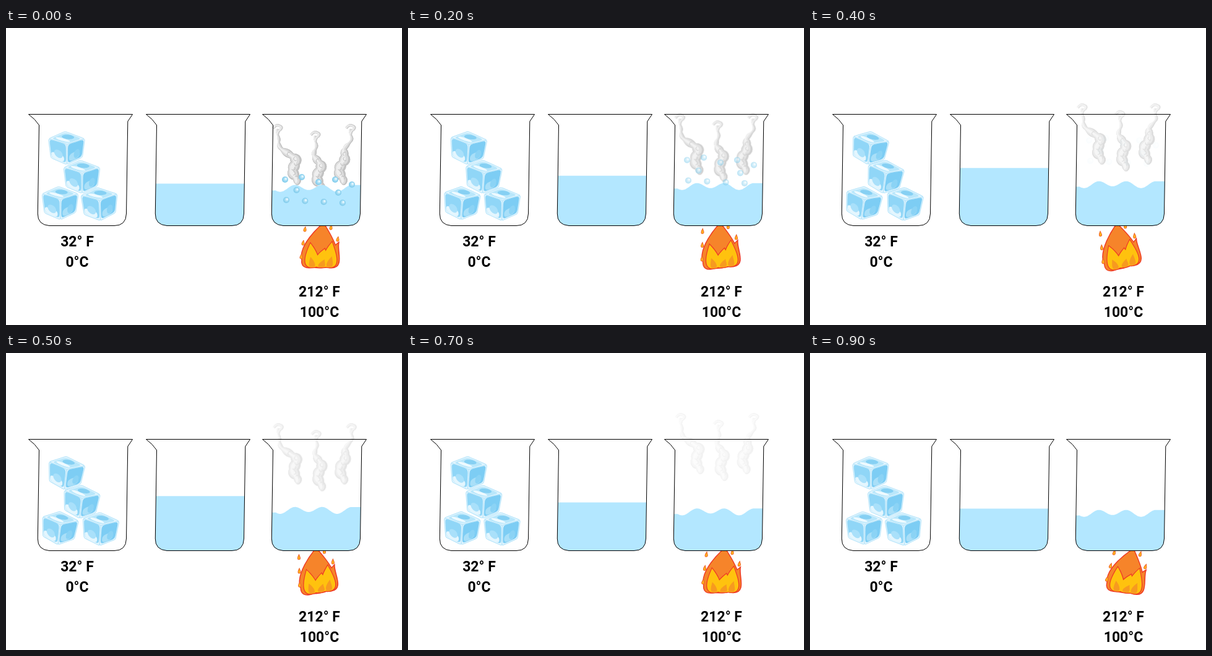
An HTML page with a canvas for the animation above (1000 ms loop, 640 by 480 pixels).

```html
<!DOCTYPE html>
<html lang="en">
<head>
<meta charset="utf-8">
<title>States of water</title>
<style>
html, body { margin: 0; width: 100%; height: 100%; overflow: hidden; background: #fff; }
canvas { display: block; }
</style>
</head>
<body>
<canvas id="stage" width="640" height="480"></canvas>
<script>
const ctx = document.getElementById('stage').getContext('2d');
const STEPS = 10, STEP_MS = 100, PEAK = 4, LAST = STEPS - 1;
const TAU = Math.PI * 2;
const beaker = new Path2D('M36.5 139.5H204.5L196.8 151L194.5 300Q194 319.5 175 319.5H70Q51 318 51.3 300L53.5 157Q47 147 36.5 139.5Z');
const hook = new Path2D('M-7 5Q-2-2 3 1Q9 3 5 7Q1 9 0 15');

const clamp = (v, lo, hi) => Math.max(lo, Math.min(hi, v));
const lerp = (a, b, t) => a + (b - a) * t;
const smooth = (u, a, b) => {
  const t = clamp((u - a) / (b - a), 0, 1);
  return t * t * (3 - 2 * t);
};

function dot(c, x, y, r) {
  c.beginPath();
  c.arc(x, y, r, 0, TAU);
  c.fill();
}

function placed(x, y, angle, fn) {
  ctx.save();
  ctx.translate(x, y);
  ctx.rotate(angle);
  fn();
  ctx.restore();
}

// Ice: three faces of a box, seen from above, painted in face coordinates
const left = [-29, -14], back = [-2, -26], right = [30, -14], front = [1, -5];
const lowLeft = [-25, 17], bottom = [1, 28], lowRight = [26, 16];
const topFace = [left, back, right, front];
const leftFace = [left, front, bottom, lowLeft];
const rightFace = [front, right, lowRight, bottom];

// Superellipse on a face: small power gives a rounded square, 1 an ellipse
function patch([a, b, c, d], color, u, v, ru, rv, power = 1) {
  const bend = n => Math.sign(n) * Math.abs(n) ** power;
  ctx.beginPath();
  for (let t = 0; t < TAU; t += TAU / 40) {
    const s = u + ru * bend(Math.cos(t)), r = v + rv * bend(Math.sin(t));
    const [x, y] = [0, 1].map(i => lerp(lerp(a[i], b[i], s), lerp(d[i], c[i], s), r));
    ctx.lineTo(x, y);
  }
  ctx.closePath();
  ctx.fillStyle = color;
  ctx.fill();
}

function drawCube() {
  ctx.strokeStyle = '#b4e4fa';
  ctx.lineWidth = 1;
  for (const face of [topFace, leftFace, rightFace]) {
    patch(face, '#e2f5fe', 0.5, 0.5, 0.5, 0.5, 0.15);
    ctx.stroke();
  }
  patch(topFace, '#b9e7fb', 0.5, 0.5, 0.42, 0.42, 0.4);
  patch(topFace, '#eefaff', 0.3, 0.5, 0.12, 0.36);
  patch(topFace, '#86d0f3', 0.65, 0.45, 0.22, 0.25);

  patch(leftFace, '#90d6f7', 0.5, 0.47, 0.45, 0.46, 0.3);
  patch(leftFace, '#e4f6fe', 0.45, 0.78, 0.38, 0.17, 0.7);
  patch(leftFace, '#a9e0fa', 0.5, 0.62, 0.25, 0.2);

  patch(rightFace, '#7dcdf4', 0.5, 0.48, 0.45, 0.46, 0.3);
  patch(rightFace, '#a9dff8', 0.45, 0.72, 0.32, 0.2, 0.8);
  patch(rightFace, '#8bd3f5', 0.6, 0.65, 0.18, 0.22);
}

function drawIce(p) {
  for (const [x, y, tilt] of [[97.5, 193, 0], [122, 239.5, 0], [87, 282, 0], [150.5, 283.5, -0.04]]) {
    placed(x + (x > 140 ? 2 : -1) * p, y, tilt + 0.14 * p, drawCube);
  }
}

// Fire: tongues given as x, width, height and lean
const body = [[18, 22, 40, 11], [-18, 20, 30, -8], [-1, 55, 72, 6]];
const flames = [[-13, 21, 40, -3], [15, 22, 42, 4], [2, 24, 31, 5]];

function tongue([x, w, h, lean], size = 1) {
  w *= size;
  h *= size;
  ctx.beginPath();
  ctx.moveTo(x, -1);
  ctx.bezierCurveTo(x - 0.9 * w, -1, x - 0.5 * w, -0.6 * h, x + lean, -h);
  ctx.bezierCurveTo(x + 0.4 * w, -0.65 * h, x + 0.9 * w, -1, x, -1);
}

function drawTongues(list, edge, fill) {
  ctx.strokeStyle = '#ee3a26';
  ctx.lineWidth = edge;
  for (const t of list) {
    tongue(t);
    ctx.stroke();
  }
  ctx.fillStyle = fill;
  for (const t of list) {
    tongue(t);
    ctx.fill();
  }
}

function drawSpark(x, y) {
  tongue([x, 5, 9, 1]);
  placed(0, y, 0, () => {
    tongue([x, 4, 9, 1]);
    ctx.fillStyle = '#ffb81c';
    ctx.strokeStyle = '#f0602a';
    ctx.lineWidth = 1;
    ctx.fill();
    ctx.stroke();
  });
}

function drawFire(sway) {
  ctx.save();
  ctx.beginPath();
  ctx.rect(440, 319, 140, 80);
  ctx.clip();
  placed(508, 388, sway / 68, () => {
    drawTongues(body, 3, '#f6842a');
    drawTongues(flames, 2.5, '#ffc20e');
    ctx.fillStyle = '#f79a1f';
    for (const t of flames) {
      tongue(t, 0.45);
      ctx.fill();
    }
    for (let i = 0; i < 3; i++) drawSpark(-25 - 3 * i, -58 + 22 * i);
    for (let i = 0; i < 2; i++) drawSpark(28 - 11 * i, -42 - 19 * i);
  });
  ctx.restore();
}

// Steam: three plumes painted once, then lifted and faded
function makeSteam() {
  const img = document.createElement('canvas');
  img.width = 640;
  img.height = 480;
  const c = img.getContext('2d');
  const shades = [['#c3c3c3', 1, 0], ['#dcdcdc', 0.75, -1], ['#efefef', 0.35, -2]];
  for (const [x0, y0, lean] of [[439, 157, 28], [500, 168, 6], [557, 157, -15]]) {
    const at = u => [
      x0 + lean * smooth(u, 0.15, 0.65) + 4 * smooth(u, 0, 0.3) * Math.cos(TAU * 2.4 * (u - 0.97)),
      y0 + 8 + 86 * u
    ];
    for (const [color, scale, shift] of shades) {
      c.strokeStyle = c.fillStyle = color;
      c.save();
      c.translate(x0 + shift / 2, y0);
      c.lineWidth = 4 * scale;
      c.stroke(hook);
      c.restore();
      for (let u = 0; u <= 1; u += 0.01) {
        const [x, y] = at(u);
        const r = (2 + 5.5 * smooth(u, 0.2, 0.6) - 3.5 * smooth(u, 0.85, 1)) * (1 + 0.22 * Math.sin(u * 48));
        dot(c, x + shift, y + shift / 2, r * scale);
      }
    }
    c.strokeStyle = '#bdbdbd';
    c.lineWidth = 1;
    for (let u = 0.45; u < 0.9; u += 0.09) {
      const [x, y] = at(u);
      c.beginPath();
      c.arc(x + 3 * Math.sin(u * 70), y, 3, u * 60, u * 60 + 3.4);
      c.stroke();
    }
  }
  return img;
}

const steam = makeSteam();

function drawSteam(step) {
  ctx.globalAlpha = 1 - step / LAST;
  ctx.drawImage(steam, 0.25 * step, -8.3 * step);
  ctx.globalAlpha = 1;
}

// Rows of bubbles: count, start, spacing and lift of every second one
function drawBubbles(step) {
  ctx.globalAlpha = Math.max(0, 1 - 0.24 * step);
  for (const [n, x0, y0, dx, dy, zig] of [[5, 451, 245, 27, 2, 6], [2, 469.5, 262, 67.5, 4, 0], [4, 453, 278, 30.3, 1.5, 0]]) {
    for (let i = 0; i < n; i++) {
      const x = x0 + dx * i, y = y0 + dy * i - zig * (i % 2) - 15.8 * step;
      const g = ctx.createRadialGradient(x + 1.5, y - 1.5, 0.5, x, y, 5);
      g.addColorStop(0, '#f2fbff');
      g.addColorStop(0.45, '#aadff5');
      g.addColorStop(1, '#7ac8ea');
      ctx.fillStyle = g;
      dot(ctx, x, y, 5);
    }
  }
  ctx.globalAlpha = 1;
}

function fillBeaker(dx, level) {
  ctx.save();
  ctx.translate(dx, 0);
  ctx.clip(beaker);
  ctx.fillStyle = '#b3e7ff';
  ctx.beginPath();
  ctx.moveTo(200, 330);
  ctx.lineTo(45, 330);
  for (let x = 45; x <= 200; x++) ctx.lineTo(x, level(x + dx));
  ctx.fill();
  ctx.restore();
}

function boil(x) {
  const a = TAU * (clamp(x, 436, 558) - 443) / 46;
  return 258.5 + 4.8 * Math.cos(a) + 1.5 * Math.cos(a / 2);
}

function label(x, y, ...lines) {
  ctx.fillStyle = '#000';
  ctx.font = '600 23px Roboto, sans-serif';
  ctx.textAlign = 'center';
  lines.forEach((text, i) => ctx.fillText(text, x, y + 33 * i));
}

function draw(step) {
  const p = step <= PEAK ? step / PEAK : (LAST - step) / (LAST - PEAK);
  const sway = step <= PEAK ? -4 * step : 5 * (step - PEAK) - 16;

  ctx.fillStyle = '#fff';
  ctx.fillRect(0, 0, 640, 480);

  drawIce(p);
  drawFire(sway);
  drawSteam(step);
  fillBeaker(190, () => 251.5 - 25.3 * p);
  fillBeaker(378, x => boil(x) - 6 * p);
  drawBubbles(step);

  ctx.strokeStyle = '#000';
  ctx.lineWidth = 1;
  for (const dx of [0, 190, 378]) placed(dx, 0, 0, () => ctx.stroke(beaker));

  label(115, 353, '32° F', '0°C');
  label(506.5, 434, '212° F', '100°C');
}

function tick() {
  draw(Math.floor(performance.now() / STEP_MS) % STEPS);
  requestAnimationFrame(tick);
}
tick();
</script>
</body>
</html>
```
